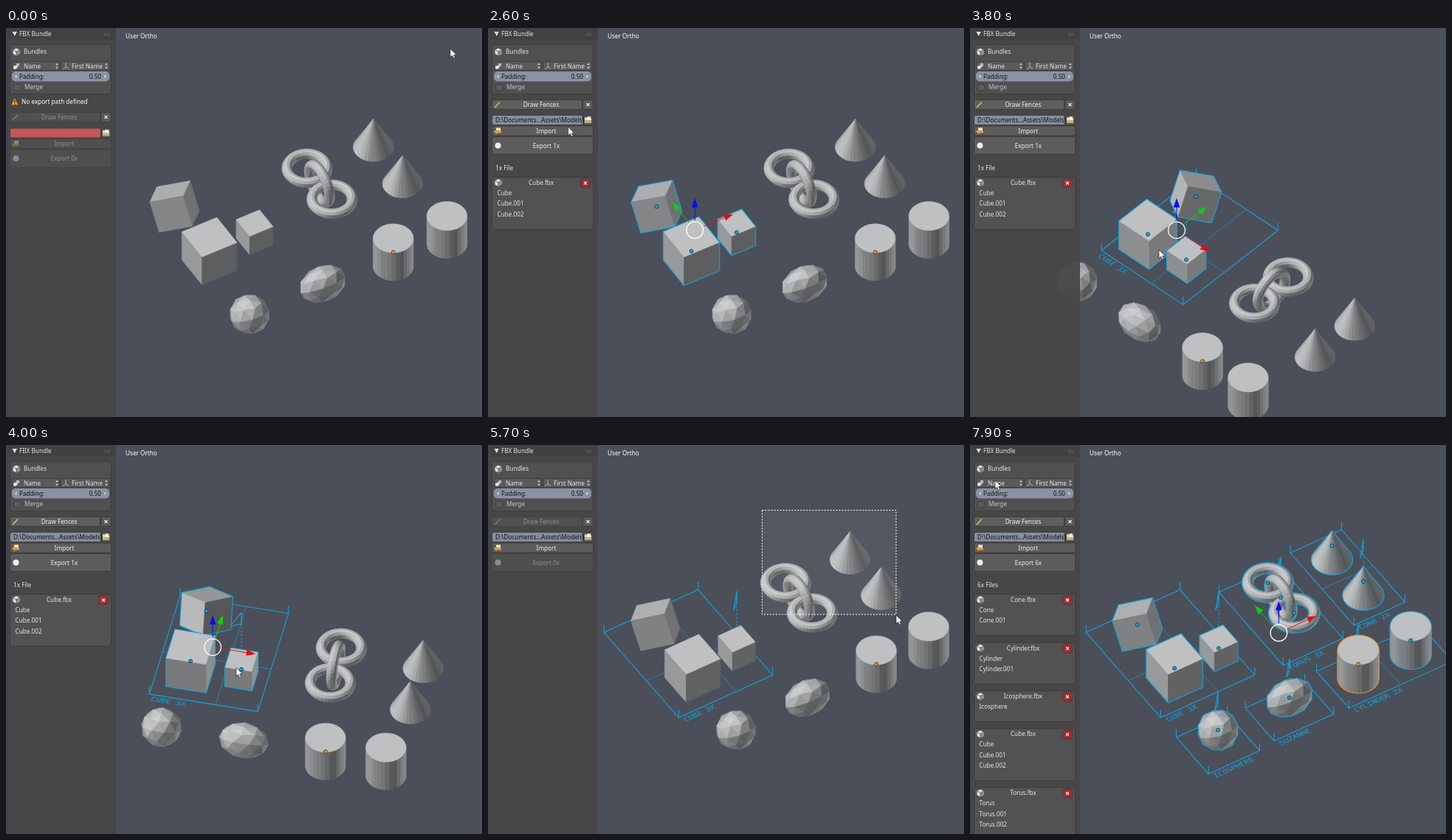
An HTML page with a canvas for the animation above (8 s loop, 645 by 528 pixels).

```html
<!DOCTYPE html>
<html lang="en">
<head>
<meta charset="utf-8">
<title>FBX Bundle</title>
<style>
  html, body { margin: 0; width: 645px; height: 528px; overflow: hidden; background: #4b4f59; }
  canvas, svg { position: absolute; left: 0; top: 0; display: block; }
  text { font: 8.2px "Noto Sans", "Open Sans", sans-serif; fill: #e4e4e4; }
  .off { opacity: .42; }
</style>
</head>
<body>
<canvas id="view" width="645" height="528"></canvas>
<svg width="645" height="528" viewBox="0 0 645 528">
  <text x="162" y="14" style="fill:#fff">User Ortho</text>
  <g id="panel"></g>
  <path id="cross" fill="none" stroke="#f4f4e8" stroke-dasharray="2 2"/>
  <rect id="marquee" fill="#fff" fill-opacity=".05" stroke="#fff" stroke-dasharray="2 2"/>
  <path id="cursor" d="M0 0V11.6L2.7 9.2 4.6 13.2 6.6 12.3 4.8 8.5H8.4Z" fill="#fff" stroke="#222" stroke-width=".7"/>
</svg>
<script>
const LOOP = 8000, TAU = Math.PI * 2, UNIT = 27.3, PAD = UNIT / 2;
const K = 0.72, H = 0.694; // sine and cosine of the camera pitch
const CYAN = '#12a3dc', ORANGE = '#f0902c';
const $ = id => document.getElementById(id);
const ctx = $('view').getContext('2d');
const range = n => Array.from({ length: n }, (_, i) => i);

// ---- vectors and meshes ----
const add = (a, b, m = 1) => a.map((v, i) => v + b[i] * m);
const dot = (a, b) => a[0] * b[0] + a[1] * b[1] + a[2] * b[2];
const cross = (a, b) => [a[1] * b[2] - a[2] * b[1], a[2] * b[0] - a[0] * b[2], a[0] * b[1] - a[1] * b[0]];
const unit = a => a.map(v => v / Math.hypot(...a));
const mean = pts => pts.reduce((s, p) => add(s, p, 1 / pts.length), [0, 0, 0]);

function face(pts, inside = [0, 0, 0]) {
  const mid = mean(pts);
  let n = unit(cross(add(pts[1], pts[0], -1), add(pts[2], pts[0], -1)));
  if (dot(n, add(mid, inside, -1)) < 0) n = n.map(v => -v);
  return { pts, n, mid };
}

function box(...edges) {
  const faces = [];
  for (const k of range(3)) for (const side of [-.5, .5]) {
    const [a, b] = [edges[(k + 1) % 3], edges[(k + 2) % 3]];
    const mid = edges[k].map(v => v * side);
    faces.push(face([[-.5, -.5], [.5, -.5], [.5, .5], [-.5, .5]].map(([u, v]) => add(add(mid, a, u), b, v))));
  }
  return faces;
}
const cube = s => box([s, 0, 0], [0, s, 0], [0, 0, s]);

function prism(topRadius) {
  const n = 32;
  const ring = (r, z) => range(n).map(i => [r * Math.cos(i * TAU / n), r * Math.sin(i * TAU / n), z]);
  const low = ring(UNIT, -UNIT), high = ring(topRadius, UNIT);
  const sides = range(n).map(i => {
    const j = (i + 1) % n;
    return face(topRadius ? [low[i], low[j], high[j], high[i]] : [low[i], low[j], high[i]]);
  });
  return [...sides, face(low), ...(topRadius ? [face(high)] : [])];
}

function ball(rx, ry, rz) {
  const g = (1 + Math.sqrt(5)) / 2, pts = [], faces = [];
  for (const a of [-1, 1]) for (const b of [-g, g]) pts.push([0, a, b], [a, b, 0], [b, 0, a]);
  const near = (a, b) => Math.hypot(...add(a, b, -1)) < 2.1;
  const size = p => { const u = unit(p); return [u[0] * rx, u[1] * ry, u[2] * rz]; };
  for (const i of range(12)) for (let j = i + 1; j < 12; j++) for (let k = j + 1; k < 12; k++) {
    const [a, b, c] = [pts[i], pts[j], pts[k]];
    if (!near(a, b) || !near(b, c) || !near(a, c)) continue;
    const [ab, bc, ca] = [add(a, b), add(b, c), add(c, a)];
    for (const tri of [[a, ab, ca], [b, ab, bc], [c, bc, ca], [ab, bc, ca]]) faces.push(face(tri.map(size)));
  }
  return faces;
}

function torus(standing) {
  const n = 40, m = 12;
  const at = (i, j, r = UNIT / 4) => {
    const a = i * TAU / n, b = j * TAU / m, w = UNIT + r * Math.cos(b);
    const [x, y, z] = [w * Math.cos(a), w * Math.sin(a), r * Math.sin(b)];
    return standing ? [z, x, y] : [x, y, z];
  };
  return range(n * m).map(q => {
    const i = Math.floor(q / m), j = q % m;
    return face([at(i, j), at(i + 1, j), at(i + 1, j + 1), at(i, j + 1)], at(i + .5, 0, 0));
  });
}

// ---- scene ----
const part = (name, x, y, z, faces) => ({ name, pos: [x, y, z], faces });
const bundles = [
  { name: 'Cone', pole: 1, rise: 82, parts: [
    part('Cone', 281, 51, 33, prism(0)), part('Cone.001', 281, -28.4, 33, prism(0))] },
  { name: 'Cylinder', pole: 0, rise: 80, parts: [
    part('Cylinder', 192, -157, 33, prism(UNIT)), part('Cylinder.001', 276, -157, 33, prism(UNIT))] },
  { name: 'Icosphere', pole: 0, rise: 75, parts: [part('Icosphere', -35, -160.7, 33, ball(UNIT, UNIT, UNIT))] },
  { name: 'Cube', pole: 1, rise: 111, parts: [
    part('Cube', -23.5, -32, 34.6, cube(2 * UNIT)), part('Cube.001', 47.2, -32, 34.6, cube(36.5)),
    part('Cube.002', -23, 63.3, 36, box([37.4, -25.1, 15.1], [30.2, 33, -15.4], [2, -21.8, -40.5]))] },
  { name: 'Torus', pole: 1, rise: 80, linked: true, parts: [
    part('Torus', 170, 38.5, 33, torus()), part('Torus.001', 170, 5, 33, torus(true)),
    part('Torus.002', 170, -29, 33, torus())] },
  { name: 'Suzanne', pole: 0, rise: 76, parts: [part('Suzanne', 79.5, -160.7, 33, ball(34, 23, 26))] }
];
const active = bundles[1].parts[0];

const extent = (p, k) => {
  const vals = p.faces.flatMap(f => f.pts.map(q => q[k] + p.pos[k]));
  return [Math.min(...vals), Math.max(...vals)];
};
for (const b of bundles) {
  const spans = k => b.parts.map(p => extent(p, k)).sort((m, n) => m[0] - n[0]);
  const bounds = k => [Math.min(...spans(k).map(s => s[0])) - PAD, Math.max(...spans(k).map(s => s[1])) + PAD];
  const gaps = k => {
    let end = Infinity;
    return spans(k).flatMap(([lo, hi]) => {
      const gap = lo > end ? [(lo + end) / 2] : [];
      end = end === Infinity ? hi : Math.max(end, hi);
      return gap;
    });
  };
  b.x = bounds(0); b.y = bounds(1); b.z = bounds(2)[0] + PAD;
  b.gapX = gaps(0); b.gapY = gaps(1);
  b.label = b.name.toUpperCase() + (b.parts.length > 1 ? ` ${b.parts.length}X` : '');
}

// ---- camera ----
let c = 1, s = 0;
const across = p => p[0] * c - p[1] * s;
const depth = p => p[0] * s + p[1] * c;
const project = p => [280 + across(p), 298.5 - K * depth(p) - H * p[2]];
const toward = p => K * p[2] - H * depth(p);

function shade(n) {
  const v = [across(n), K * depth(n) + H * n[2], toward(n)];
  const lit = (dir, power) => Math.max(0, dot(v, dir)) * power;
  const sum = lit([-.685, .23, .69], 1.05) + lit([.747, .585, .315], .5) + lit([.434, -.789, -.434], .8);
  const g = Math.round(Math.min(205, 12 + 178 * sum));
  return `rgb(${g},${g + 1},${g + 2})`;
}

function trace(pts, close) {
  ctx.beginPath();
  pts.forEach((p, i) => ctx[i ? 'lineTo' : 'moveTo'](...p));
  if (close) ctx.closePath();
}
function line(color, ...pts) {
  ctx.strokeStyle = color;
  trace(pts.map(project));
  ctx.stroke();
}

function drawFence(b) {
  const [x0, x1] = b.x, [y0, y1] = b.y, z = b.z;
  ctx.lineWidth = 1.1;
  const corners = [[x0, y0, z], [x1, y0, z], [x1, y1, z], [x0, y1, z]];
  line(CYAN, ...corners, corners[0]);
  for (const p of corners) line(CYAN, p, add(p, [0, 0, 15]));
  ctx.lineWidth = .6;
  for (const x of b.gapX) line(CYAN, [x, y0, z], [x, y1, z]);
  for (const y of b.gapY) line(CYAN, [x0, y, z], [x1, y, z]);
  ctx.lineWidth = 1.1;
  const foot = b.parts[b.pole].pos, top = add(foot, [0, 0, b.rise]);
  ctx.setLineDash([2.5, 2.5]);
  line(CYAN, foot, top);
  ctx.setLineDash([]);
  const low = add(top, [0, 0, -22]);
  line(CYAN, low, top, add(low, [-13, -13, 5]), low);
  ctx.save();
  ctx.transform(c, -K * s, s, K * c, ...project([x0 + 4, y0 - 12, z]));
  ctx.font = '11.5px "DejaVu Sans Mono", monospace';
  ctx.fillStyle = CYAN;
  ctx.fillText(b.label, 0, 0);
  ctx.restore();
}

function drawSolid(parts, outline) {
  const shown = parts.flatMap(p => p.faces.filter(f => toward(f.n) > 0).map(f => ({
    pts: f.pts.map(q => project(add(q, p.pos))), color: shade(f.n), near: toward(add(f.mid, p.pos))
  }))).sort((a, b) => a.near - b.near);
  ctx.lineJoin = 'round';
  if (outline) {
    ctx.strokeStyle = outline;
    ctx.lineWidth = 2.8;
    for (const f of shown) { trace(f.pts, true); ctx.stroke(); }
  }
  ctx.lineWidth = .6;
  for (const f of shown) {
    ctx.fillStyle = ctx.strokeStyle = f.color;
    trace(f.pts, true); ctx.fill(); ctx.stroke();
  }
}

function drawDot(p, color) {
  ctx.beginPath();
  ctx.arc(...project(p), 2.5, 0, TAU);
  ctx.fillStyle = color; ctx.strokeStyle = '#16303c'; ctx.lineWidth = .8;
  ctx.fill(); ctx.stroke();
}

function drawGizmo(center) {
  const [x, y] = project(center);
  const axes = [[[1, 0, 0], '#e80c0c'], [[0, 1, 0], '#0cd010'], [[0, 0, 1], '#0a0af0']];
  for (const [dir, color] of axes) {
    const [tx, ty] = project(add(center, dir, 53));
    const len = Math.hypot(tx - x, ty - y), ux = (tx - x) / len, uy = (ty - y) / len;
    const at = (along, side) => [x + ux * along - uy * side, y + uy * along + ux * side];
    ctx.lineWidth = 1;
    ctx.strokeStyle = ctx.fillStyle = color;
    trace([at(13, 0), at(len, 0)]); ctx.stroke();
    trace([at(len - 6, -4.3), at(len + 6.5, 0), at(len - 6, 4.3)], true); ctx.fill();
  }
  ctx.beginPath();
  ctx.arc(x, y, 11.3, 0, TAU);
  ctx.strokeStyle = '#fff'; ctx.lineWidth = 1.3; ctx.stroke();
}

function drawView(angle, selected, fenced) {
  c = Math.cos(angle * Math.PI / 180);
  s = Math.sin(angle * Math.PI / 180);
  ctx.fillStyle = '#4b4f59';
  ctx.fillRect(0, 0, 645, 528);
  fenced.forEach(drawFence);
  const solids = bundles.flatMap(b => b.linked ? [{ b, parts: b.parts }] : b.parts.map(p => ({ b, parts: [p] })));
  solids.sort((m, n) => depth(mean(n.parts.map(p => p.pos))) - depth(mean(m.parts.map(p => p.pos))));
  for (const { b, parts } of solids)
    drawSolid(parts, selected.includes(b) && (parts[0] === active ? ORANGE : CYAN));
  const picked = selected.flatMap(b => b.parts);
  for (const p of picked) if (p !== active) drawDot(p.pos, CYAN);
  drawDot(active.pos, ORANGE);
  if (picked.length) drawGizmo(mean(picked.map(p => p.pos)));
}

// ---- side panel ----
const rect = (x, y, w, h, fill, extra = '') =>
  `<rect x="${x}" y="${y}" width="${w}" height="${h}" rx="2.5" fill="${fill}" ${extra}/>`;
const frame = (x, y, w, h, fill) => rect(x + .5, y + .5, w - 1, h - 1, fill, 'stroke="#393939" stroke-width=".8"');
const text = (x, y, str, fill = '#e4e4e4', anchor = 'start') =>
  `<text x="${x}" y="${y}" text-anchor="${anchor}" style="fill:${fill}">${str}</text>`;
const path = (d, fill, extra = '') => `<path d="${d}" fill="${fill}" ${extra}/>`;
const move = (x, y, body) => `<g transform="translate(${x} ${y})">${body}</g>`;
const dim = (on, body) => `<g class="${on ? '' : 'off'}">${body}</g>`;
const cubeIcon = (x, y) => move(x, y, path('M0-5 4.5-2.7V2.5L0 5-4.5 2.5V-2.7Z', '#e2e2e2') +
  path('M0 0V5L4.5 2.5V-2.7Z', '#8f8f8f') + path('M-4.5-2.7 0-.4 4.5-2.7M0-.4V5', 'none', 'stroke="#333" stroke-width=".7"'));
const arrows = (x, y) => move(x, y, path('M-2-1.2 0-4 2-1.2ZM-2 1.2 0 4 2 1.2Z', '#c4c4c4'));
const closeMark = (x, y, w) => move(x, y, path('M-2-2 2 2M2-2-2 2', 'none', `stroke="#eee" stroke-width="${w}"`));
const folder = y => frame(129, y, 14, 14, '#595959') +
  move(135.5, y + 7, path('M-4.5-3.5H-1L0-2.2H4.5V3.8H-4.5Z', '#e8dcae') + path('M-1-4.5H3.5V-.5H-1Z', '#fff') + path('M-4.5 0H4.5V3.8H-4.5Z', '#c6b274'));

function fileBoxes(selected) {
  if (!selected.length) return '';
  let y = 210;
  let out = text(10, 193, `${selected.length}x File${selected.length > 1 ? 's' : ''}`);
  for (const b of selected) {
    const tall = 13.5 + 14.4 * b.parts.length;
    out += frame(5, y - 8, 138, tall + 15, '#525252') + cubeIcon(14, y) + text(72, y + 3, b.name + '.fbx', '#e4e4e4', 'middle');
    out += frame(125, y - 6, 14, 13, '#a02c30') + closeMark(132, y + .5, 1.3);
    b.parts.forEach((p, i) => { out += text(12.5, y + 17 + i * 14.4, p.name); });
    y += tall + 23.2 - 13.5 + 14 - .4;
  }
  return out;
}

function panel(hasPath, selected) {
  const n = selected.length, on = n > 0, top = hasPath ? 97 : 114, field = hasPath ? 118 : 135.5, act = hasPath ? 132.5 : 150;
  let out = rect(0, 0, 149, 528, '#474747', 'style="rx:0" fill-opacity=".95"') + path('M0 0H1.5V528H0Z', '#3f4452') + path('M2 0H149V15.5H2Z', '#414141');
  out += path('M8.5 5H15L11.7 11Z', '#ddd') + text(18, 10.6, 'FBX Bundle');
  out += path('M133 7.5H141M133 10H141', 'none', 'stroke="#777" stroke-dasharray="1.4 1"');
  out += frame(5, 22, 138, 68, '#505050') + cubeIcon(14, 32.5) + text(24, 35.3, 'Bundles');
  out += frame(8, 45, 65, 13, '#5a5a5a') + frame(74, 45, 67, 13, '#5a5a5a');
  out += move(14, 52, path('M-4 0 0-1.5 2 1-1 4-4 3Z', '#e8e8e8') + path('M0-4H4V0H0Z', '#bbb'));
  out += text(24, 54.7, 'Name') + arrows(69, 51.5) + text(89, 54.7, 'First Name') + arrows(136, 51.5);
  out += path('M81 47V53L77 56M81 53 85 55', 'none', 'stroke="#ccc" stroke-width=".8"');
  out += rect(8, 59, 132, 13.5, '#8a92a3', 'style="rx:5px"') + text(18, 68.8, 'Padding:', '#111') + text(129, 68.8, '0.50', '#111', 'end');
  out += path('M14.5 63.5V68L12 65.7ZM133.5 63.5V68L136 65.7Z', '#dde');
  out += frame(10, 76, 10, 9.5, '#5c5c5c') + text(25, 83.2, 'Merge', '#c8c8c8');
  if (!hasPath) {
    out += path('M11.8 95 16.6 104.5H7Z', '#f0a028', 'stroke="#7a4a10" stroke-width=".6"');
    out += path('M11.8 98V101.3M11.8 102.3V103.5', 'none', 'stroke="#222" stroke-width="1.2"') + text(21, 103.3, 'No export path defined', '#fff');
  }
  out += dim(on, frame(5, top, 123, 14, '#5e5e5e') + text(72, top + 10.2, 'Draw Fences', '#f0f0f0', 'middle') +
    path(`M9 ${top + 11} 16 ${top + 3.5}`, 'none', 'stroke="#e0b070" stroke-width="1.8"'));
  out += frame(128, top, 15, 14, '#595959') + closeMark(135.5, top + 7, 1.2);
  out += frame(5, field, 124, 14, hasPath ? '#858da0' : '#c0585c') + folder(field);
  if (hasPath) out += text(10, field + 10, 'D:\\Documents...Assets\\Models\\', '#111');
  out += dim(hasPath, frame(5, act, 138, 14, '#5c5c5c') + text(79, act + 10, 'Import', '#f0f0f0', 'middle') +
    move(13, act + 7, path('M-2-4H4V0H-2Z', '#f2e6cc') + path('M-5 1-1-2V0H5V3H-1V5Z', '#e59a45')));
  out += dim(on, frame(5, act + 14.5, 138, 25, '#5c5c5c') + text(79, act + 30.2, `Export ${n}x`, '#f0f0f0', 'middle') +
    `<circle cx="13.5" cy="${act + 27}" r="4" fill="#eee"/>`);
  return out + fileBoxes(selected);
}

// ---- timeline ----
function track(t, keys) {
  const i = keys.findIndex(k => k[0] > t);
  if (i < 0) return keys[keys.length - 1].slice(1);
  if (!i) return keys[0].slice(1);
  const [a, b] = [keys[i - 1], keys[i]], f = (t - a[0]) / (b[0] - a[0]);
  return a.slice(1).map((v, j) => v + (b[j + 1] - v) * f);
}
const pointer = [
  [0, 602, 28], [550, 112, 142], [700, 112, 144], [1100, 175, 147], [1600, 175, 147], [2100, 365, 346],
  [2250, 365, 346], [2650, 72, 104], [2850, 72, 104], [3050, 390, 304], [3400, 321, 303], [3800, 256, 301],
  [4300, 396, 304], [4600, 396, 304], [5200, 371, 89], [5450, 371, 89], [5700, 553, 231], [6700, 553, 231],
  [7300, 72, 104], [7500, 72, 104], [7900, 34, 48]
];
const orbit = [[3050, 30], [3400, -5.2], [3800, -42.6], [4300, 32.2]];
const drags = [[1600, 2200, 175, 147], [5450, 5900, 371, 89]];

function selection(t) {
  const only = (...names) => bundles.filter(b => names.includes(b.name));
  if (t >= 6600) return bundles;
  if (t >= 5900) return only('Cone', 'Torus');
  return t >= 2200 && t < 4700 ? only('Cube') : [];
}

let panelKey = '';
function render(t) {
  const [mx, my] = track(t, pointer), selected = selection(t), hasPath = t >= 700;
  const fenced = bundles.filter(b => t >= (b.name === 'Cube' ? 2800 : 7400));
  drawView(track(t, orbit)[0], selected, fenced);
  const key = hasPath + selected.map(b => b.name).join();
  if (key !== panelKey) $('panel').innerHTML = panel(hasPath, selected);
  panelKey = key;

  $('cursor').setAttribute('transform', `translate(${mx} ${my})`);
  const aiming = (t >= 1200 && t < 1650) || (t >= 5200 && t < 5500);
  const px = Math.floor(mx) - .5, py = Math.floor(my) - .5;
  $('cross').setAttribute('d', aiming ? `M${px} 0V528M0 ${py}H645` : '');
  const drag = drags.find(([from, to]) => t > from + 50 && t < to);
  $('marquee').style.display = drag ? '' : 'none';
  if (drag) {
    const [, , x, y] = drag;
    Object.entries({ x: x + .5, y: y - .5, width: px - x, height: py - y })
      .forEach(([name, v]) => $('marquee').setAttribute(name, Math.max(0, v)));
  }
}

const start = performance.now();
function tick() {
  const t = (performance.now() - start) % LOOP;
  render(Math.floor(t / 100) * 100);
  requestAnimationFrame(tick);
}
tick();
</script>
</body>
</html>
```
